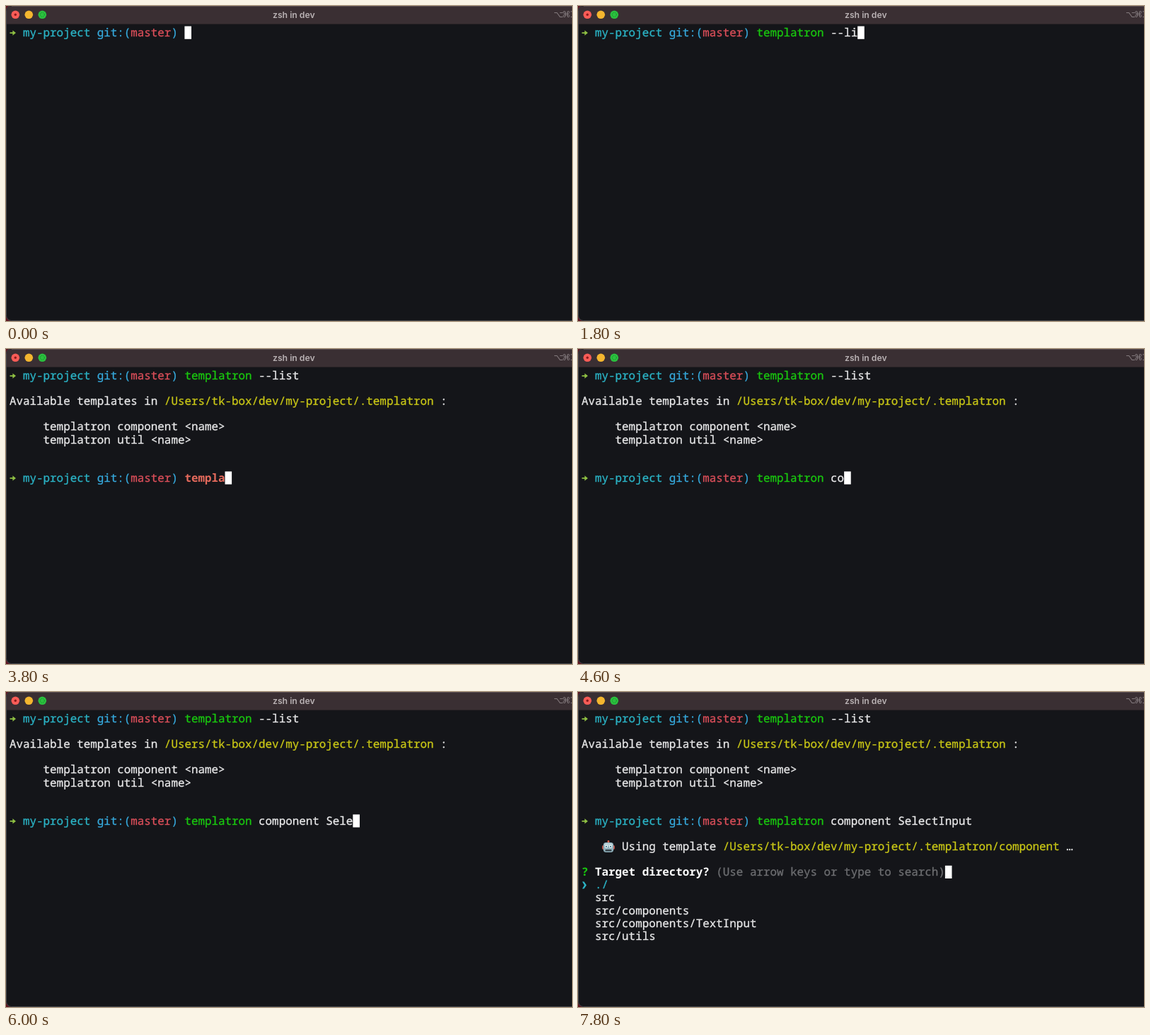
Animation of 800 by 446 pixels, one loop 8 s. Source, as an HTML page:

```html
<!DOCTYPE html>
<html lang="en">
<head>
<meta charset="utf-8">
<title>Terminal</title>
<style>
  html, body { margin: 0; width: 100%; height: 100%; overflow: hidden; background: #141519; }
  svg { display: block; width: 100vw; height: 100vh; }
  .term text {
    font-family: "Noto Sans Mono", "DejaVu Sans Mono", monospace; font-size: 15.86px;
    white-space: pre; text-rendering: geometricPrecision; stroke-width: .3;
  }
  .title { font: 600 12.2px Inter, sans-serif; fill: #b9b2b4; text-anchor: middle; }
  .keys { font: 12px "DejaVu Sans", sans-serif; fill: #857c7f; }
</style>
</head>
<body>
<svg viewBox="0 0 800 446">
  <rect width="800" height="446" fill="#5e1622"/>
  <rect x=".5" y="-.5" width="820" height="446" rx="7" fill="#141519" stroke="#45464b"/>
  <path d="M1 26V7Q1 0 8 0H800V26Z" fill="#3a2f33"/>
  <path d="M1 25.5H800" stroke="#2b2427"/>
  <path d="M8 .5H800" stroke="#574b4f"/>
  <circle cx="13.3" cy="12.3" r="5.8" fill="#f95c57"/>
  <circle cx="13.3" cy="12.3" r="1.7" fill="#8c1a1c"/>
  <circle cx="32.3" cy="12.3" r="5.8" fill="#f4b62f"/>
  <circle cx="51.3" cy="12.3" r="5.8" fill="#2bc13f"/>
  <circle cx="51.3" cy="12.3" r="3" fill="none" stroke="#168a29" stroke-dasharray="1.4 1"/>
  <text class="title" x="406.8" y="16.5">zsh in dev</text>
  <text class="keys" y="16"><tspan x="774">⌥</tspan><tspan x="786">⌘</tspan><tspan x="797">1</tspan></text>
  <g class="term" id="screen"></g>
  <rect id="cursor" width="9.6" height="18.2" fill="#fff"/>
</svg>
<script>
const NS = 'http://www.w3.org/2000/svg';
const LOOP = 8000, TICK = 200;
const LEFT = 5, TOP = 28.6, CELL_W = 9.516, CELL_H = 18.1;
const INPUT_COL = 26;
const C = {
  text: '#e9e9ea', white: '#ffffff', cyan: '#2bb3c5', blue: '#36a9dc', red: '#dc4f5a',
  error: '#e56a5c', green: '#19c80f', lime: '#8fc043', yellow: '#c9c716', gray: '#6d6e71'
};
const HOME = '/Users/tk-box/dev/my-project/.templatron';

const screen = document.getElementById('screen');
const cursor = document.getElementById('cursor');
const colX = col => LEFT + col * CELL_W;
const rowY = row => TOP + row * CELL_H;

function add(parent, tag, attrs, content = '') {
  const el = document.createElementNS(NS, tag);
  for (const key in attrs) el.setAttribute(key, attrs[key]);
  el.textContent = content;
  return parent.appendChild(el);
}

// runs: [content, colour, bold]
function write(parent, row, col, ...runs) {
  for (const [content, fill, bold] of runs) {
    add(parent, 'text', {
      x: colX(col), y: rowY(row) + 14.4, fill,
      stroke: bold ? 'none' : fill, 'font-weight': bold ? 700 : 400
    }, content);
    col += content.length;
  }
}

function prompt(parent, row) {
  const y = rowY(row) + 9.5;
  add(parent, 'path', {
    d: `M5.5 ${y - .9}H9.4V${y - 3.7}L14 ${y}L9.4 ${y + 3.7}V${y + .9}H5.5Z`, fill: C.lime
  });
  write(parent, row, 2, ['my-project', C.cyan], [' git:(', C.blue], ['master', C.red], [')', C.blue]);
}

function robot(parent, x, y) {
  const g = add(parent, 'g', { transform: `translate(${x} ${y})` });
  const box = (x, y, width, height, rx, fill) => add(g, 'rect', { x, y, width, height, rx, fill });
  box(7.7, 0, 2.6, 4, 1.3, '#d9604e');
  box(0, 7, 18, 6, 2, '#c5564a');
  box(1.8, 3, 14.4, 14, 4, '#8fb0bb');
  box(3, 4, 12, 4, 2, '#b9d0d6');
  for (const cx of [6, 12]) {
    add(g, 'circle', { cx, cy: 8.8, r: 2.2, fill: '#eef6f4' });
    add(g, 'circle', { cx, cy: 8.8, r: 1.1, fill: '#2c6f86' });
  }
  box(4.5, 13, 9, 2.4, 1, '#39454c');
}

const group = () => add(screen, 'g', {});

prompt(screen, 0);

const listing = group();
write(listing, 2, 0, ['Available templates in ', C.text], [HOME, C.yellow], [' :', C.text]);
write(listing, 4, 5, ['templatron component <name>', C.text]);
write(listing, 5, 5, ['templatron util <name>', C.text]);
prompt(listing, 8);

const picker = group();
robot(picker, 34, 210);
write(picker, 10, 6, ['Using template ', C.text], [HOME + '/component', C.yellow], [' …', C.text]);
write(picker, 12, 0, ['? ', C.green, true], ['Target directory? ', C.white, true],
  ['(Use arrow keys or type to search)', C.gray]);
add(picker, 'path', {
  d: `M6 ${rowY(13) + 4.5}H8.6L12 ${rowY(13) + 9.5}L8.6 ${rowY(13) + 14.5}H6L9 ${rowY(13) + 9.5}Z`, fill: C.cyan
});
write(picker, 13, 2, ['./', C.cyan]);
['src', 'src/components', 'src/components/TextInput', 'src/utils']
  .forEach((dir, i) => write(picker, 14 + i, 2, [dir, C.text]));

// keys: [time, characters typed], linear in between
const commands = [
  { row: 0, line: 'templatron --list', keys: [[200, 0], [1800, 15], [2000, 17]] },
  { row: 8, line: 'templatron component SelectInput', keys: [[3200, 0], [3800, 6], [5400, 21], [6800, 31], [7000, 32]] }
];
for (const cmd of commands) cmd.view = group();

function typed(keys, t) {
  if (t <= keys[0][0]) return 0;
  for (let i = 1; i < keys.length; i++) {
    const [t0, n0] = keys[i - 1], [t1, n1] = keys[i];
    if (t <= t1) return Math.floor(n0 + (n1 - n0) * (t - t0) / (t1 - t0));
  }
  return keys[keys.length - 1][1];
}

function cursorCell(t, counts) {
  if (t >= 7400) return [12, 54];
  if (t >= 7200) return [9, 0];
  if (t >= 2400) return [8, INPUT_COL + counts[1]];
  if (t >= 2200) return [1, 0];
  return [0, INPUT_COL + counts[0]];
}

function render(t) {
  const show = (el, on) => el.setAttribute('visibility', on ? 'visible' : 'hidden');
  show(listing, t >= 2400);
  show(picker, t >= 7400);
  const counts = commands.map(({ row, line, keys, view }) => {
    const n = typed(keys, t), known = n >= 10;
    view.replaceChildren();
    write(view, row, INPUT_COL,
      [line.slice(0, Math.min(n, 10)), known ? C.green : C.error, !known],
      [line.slice(10, Math.max(n, 10)), C.text]);
    return n;
  });
  const [row, col] = cursorCell(t, counts);
  cursor.setAttribute('x', colX(col));
  cursor.setAttribute('y', rowY(row));
}

const start = performance.now();
let last = -1;
function frame() {
  const t = Math.floor((performance.now() - start) % LOOP / TICK) * TICK;
  if (t !== last) render(last = t);
  requestAnimationFrame(frame);
}
render(0);
requestAnimationFrame(frame);
</script>
</body>
</html>
```
